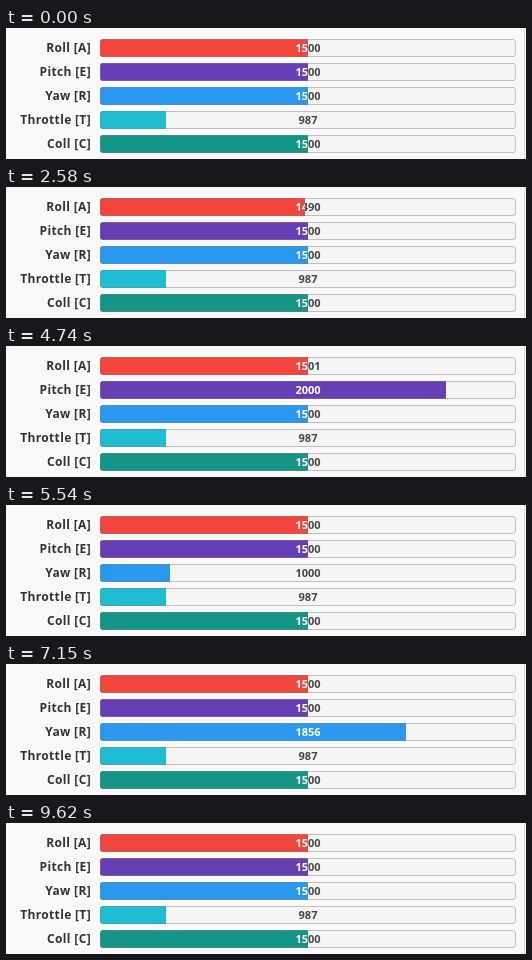
An HTML page for the animation above (9700 ms loop, 520 px wide and 131 px high).

```html
<!DOCTYPE html>
<html lang="en">
<head>
<meta charset="utf-8">
<title>Receiver channels</title>
<style>
html, body { margin: 0; width: 100%; height: 100%; overflow: hidden; background: #f9f9f9; }
body { position: relative; font: bold 12px/20px "Open Sans", sans-serif; color: #333; }
#edge { position: absolute; left: 518px; top: 0; width: 1px; height: 100%; background: #ddd; }
.name { position: absolute; left: 0; width: 85px; text-align: right; letter-spacing: .35px; }
.meter {
  position: absolute; left: 94px; width: 416px; height: 18px; overflow: hidden;
  border-radius: 3px; background: #f4f4f4; font-size: 11px; line-height: 18px; color: #474747;
}
/* translucent frame that also tints the fill */
.meter::after {
  content: ""; position: absolute; inset: 0; border-radius: 3px;
  border: 1px solid rgba(130, 130, 130, .45);
}
.fill { position: absolute; left: 0; top: 0; height: 18px; overflow: hidden; }
.value { position: absolute; left: 0; top: 0; width: 416px; text-align: center; }
.fill .value { color: #fff; }
</style>
</head>
<body>
<div id="edge"></div>
<script>
const LOOP = 9700, TICK = 80, PHASE = 20;
const CENTER = 1500, LOW = 1000, HIGH = 2000;
const WIDTH = 414, MIN = 750, RANGE = 1500;

// A stick goes down, rests, goes up, rests and springs back
function sweep(down, low, up, high, back, end, rebound = CENTER) {
  return [[down, CENTER], [low, LOW], [up, LOW], [high, HIGH], [back, HIGH],
          [end, rebound], [end + 200, CENTER]];
}

// noise: [ticks between flickers, size]
const channels = [
  { name: 'Roll [A]', color: '#f1453d', noise: [11, 1],
    curve: sweep(840, 1300, 1560, 2080, 2200, 2580, 1490) },
  { name: 'Pitch [E]', color: '#673fb4', curve: sweep(3110, 3360, 3810, 4490, 4830, 5060) },
  { name: 'Yaw [R]', color: '#2b98f0', noise: [8, -1],
    curve: sweep(5320, 5540, 5810, 6570, 7108, 7219) },
  { name: 'Throttle [T]', color: '#1fbcd2', curve: [[0, 987]] },
  { name: 'Coll [C]', color: '#159588', curve: sweep(7690, 7870, 8250, 8820, 9130, 9380) }
];

function add(parent, cls, text = '') {
  const el = document.createElement('div');
  el.className = cls;
  el.textContent = text;
  return parent.appendChild(el);
}

channels.forEach((ch, i) => {
  add(document.body, 'name', ch.name).style.top = 10 + 24 * i + 'px';
  const meter = add(document.body, 'meter');
  meter.style.top = 11 + 24 * i + 'px';
  ch.dark = add(meter, 'value');
  ch.fill = add(meter, 'fill');
  ch.fill.style.background = ch.color;
  ch.light = add(ch.fill, 'value');
});

function interpolate(curve, t) {
  const i = curve.findIndex(([time]) => time > t);
  if (i < 0) return curve[curve.length - 1][1];
  if (i === 0) return curve[0][1];
  const [t0, v0] = curve[i - 1], [t1, v1] = curve[i];
  return Math.round(v0 + (v1 - v0) * (t - t0) / (t1 - t0));
}

function reading({ curve, noise }, n) {
  const v = interpolate(curve, n * TICK + PHASE);
  return noise && v === CENTER && n % noise[0] === 4 ? v + noise[1] : v;
}

const start = performance.now();
function draw() {
  const now = (performance.now() - start) % LOOP;
  const n = Math.floor((now - PHASE) / TICK);
  for (const ch of channels) {
    const v = reading(ch, n);
    ch.dark.textContent = ch.light.textContent = v;
    ch.fill.style.width = 1 + Math.floor((v - MIN) * WIDTH / RANGE) + 'px';
  }
  requestAnimationFrame(draw);
}
draw();
</script>
</body>
</html>
```
